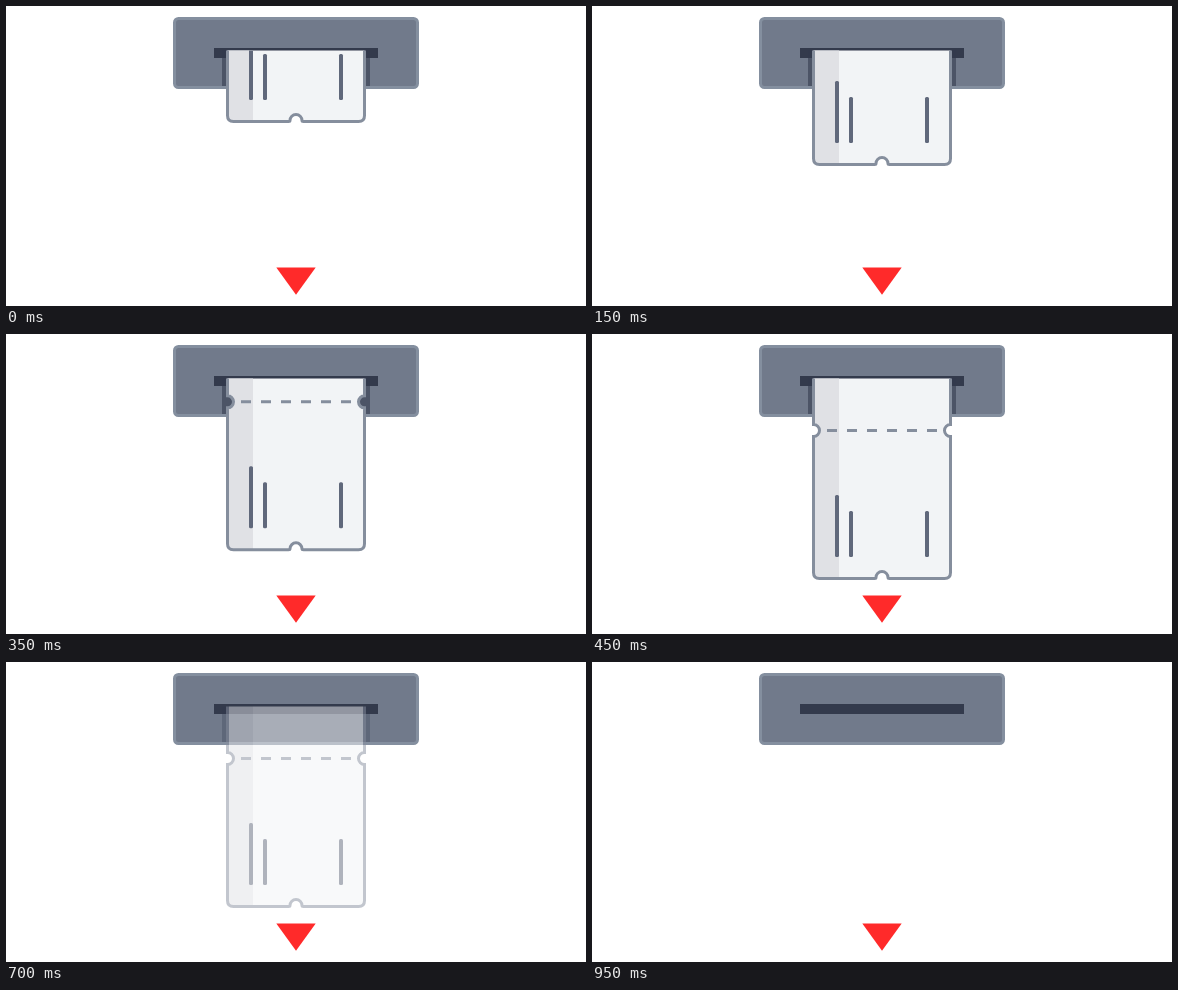
These frames come from a looping animation (580 by 300 pixels, 1000 ms). An HTML page:

```html
<!DOCTYPE html>
<html lang="en">
<head>
<meta charset="utf-8">
<title>Ticket dispenser</title>
<style>
  html, body { margin: 0; width: 100%; height: 100%; overflow: hidden; background: #fff; }
  svg { display: block; width: 580px; height: 300px; }
</style>
</head>
<body>
<svg viewBox="0 0 580 300">
  <defs>
    <clipPath id="below-slot"><rect x="200" y="44.5" width="180" height="256"/></clipPath>
    <!-- Ticket in its fully printed position -->
    <path id="outline" d="M221.5 20V90.5A6 6 0 0 1 221.5 102.5V238.5Q221.5 244.5 227.5 244.5H282.5Q284 244.5 284 243.5A6 6 0 0 1 296 243.5Q296 244.5 297.5 244.5H352.5Q358.5 244.5 358.5 238.5V102.5A6 6 0 0 1 358.5 90.5V20Z"/>
    <clipPath id="inside"><use href="#outline"/></clipPath>
  </defs>

  <rect x="168.5" y="12.5" width="243" height="69" rx="4" fill="#717a8b" stroke="#848f9f" stroke-width="3"/>
  <rect x="208" y="42" width="164" height="10" fill="#333a4c"/>
  <rect id="shadow" x="216" y="44.5" width="148" height="35.5" fill="#333a4c"/>

  <g id="fade" clip-path="url(#below-slot)">
    <g id="ticket">
      <use href="#outline" fill="#f2f4f6"/>
      <rect x="221" y="20" width="26" height="225" fill="#e0e1e5" clip-path="url(#inside)"/>
      <use href="#outline" fill="none" stroke="#858e9d" stroke-width="3"/>
      <path d="M235 96.5H345" stroke="#858e9d" stroke-width="3" stroke-dasharray="10"/>
      <g fill="#60687b">
        <rect x="243" y="161" width="4" height="62" rx="1.5"/>
        <rect x="257" y="177" width="4" height="46" rx="1.5"/>
        <rect x="333" y="177" width="4" height="46" rx="1.5"/>
      </g>
    </g>
  </g>

  <path d="M270.3 261.5H309.7L290 288.7Z" fill="#ff2a2a"/>
</svg>
<script>
  const LOOP = 1000, STEP = 50;
  const PRINT_END = 450, FADE_END = 950;
  const TRAVEL = 129, SHADE = 0.58;

  const ticket = document.getElementById('ticket');
  const fade = document.getElementById('fade');
  const shadow = document.getElementById('shadow');
  const clamp = v => Math.min(1, Math.max(0, v));

  function draw(ms) {
    const t = Math.floor((ms % LOOP) / STEP) * STEP;
    const printed = clamp(t / PRINT_END);
    const alpha = 1 - clamp((t - PRINT_END) / (FADE_END - PRINT_END));
    ticket.setAttribute('transform', `translate(0 ${TRAVEL * (printed - 1)})`);
    fade.setAttribute('opacity', alpha);
    shadow.setAttribute('opacity', alpha * SHADE);
  }

  const start = performance.now();
  function tick() {
    draw(performance.now() - start);
    requestAnimationFrame(tick);
  }
  tick();
</script>
</body>
</html>
```
